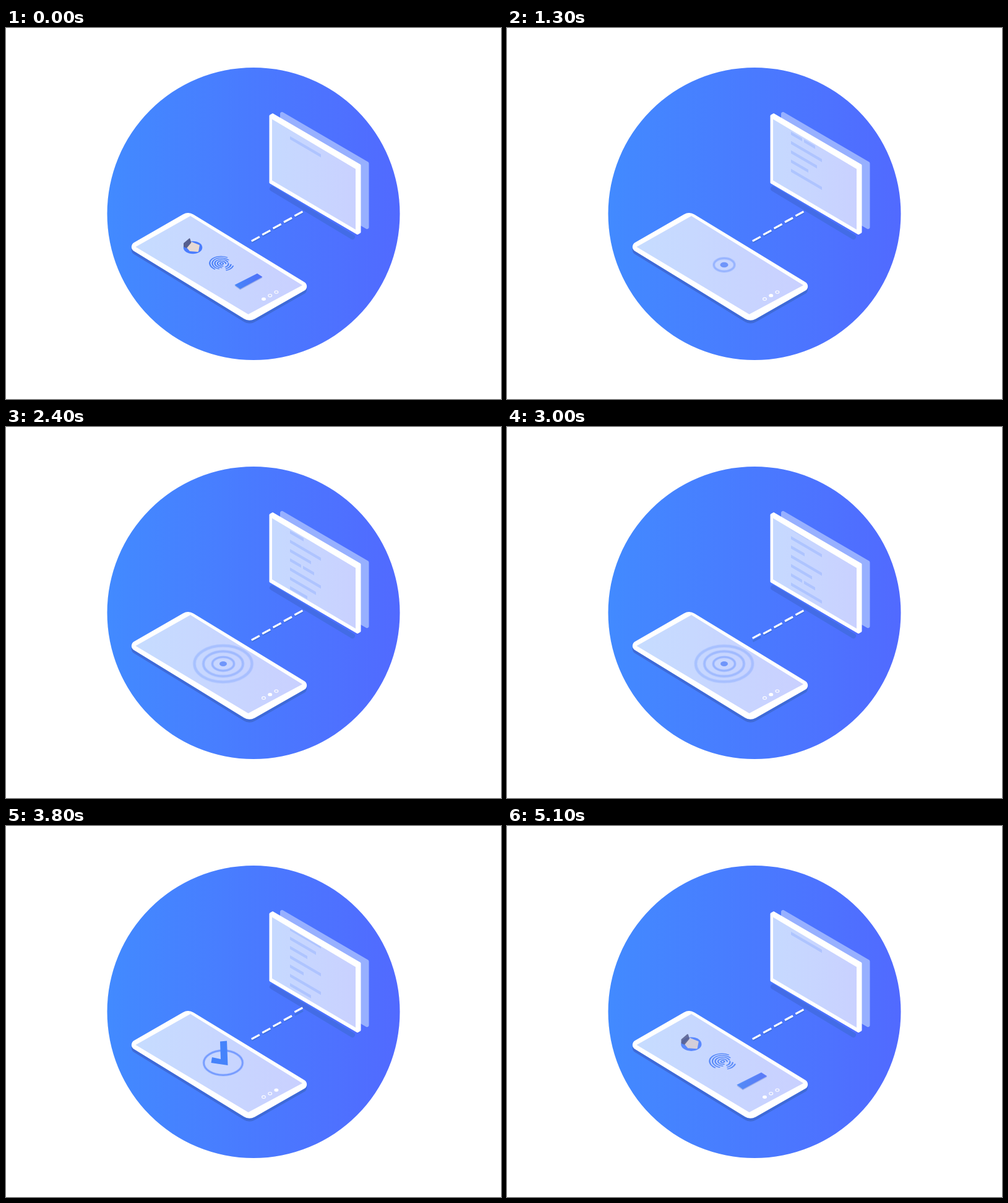
Animation, 800 px wide and 600 px high, one loop 5.2 s. Source, as an HTML page with a canvas:

```html
<!DOCTYPE html>
<html lang="en">
<head>
<meta charset="utf-8">
<title>Phone pairing</title>
<style>
html, body { margin: 0; width: 100%; height: 100%; overflow: hidden; background: #fff; }
canvas { display: block; width: 800px; height: 600px; }
</style>
</head>
<body>
<canvas id="stage" width="800" height="600"></canvas>
<script>
const ctx = document.getElementById('stage').getContext('2d');
const LOOP = 5200, STEP = 100;
const SLOPE = .585;
const blue = alpha => `rgba(74,125,255,${alpha})`;

const ramp = (t, from, to) => Math.min(1, Math.max(0, (t - from) / (to - from)));
const smooth = p => p * p * (3 - 2 * p);
const backOut = p => p <= 0 ? 0 : 1 + 2.7 * (p - 1) ** 3 + 1.7 * (p - 1) ** 2;
const pop = (t, start, length = 300) => backOut(ramp(t, start, start + length));

function gradient(x0, x1, from, to) {
  const g = ctx.createLinearGradient(x0, 0, x1, 0);
  g.addColorStop(0, from);
  g.addColorStop(1, to);
  return g;
}

// Polygon whose corners are rounded by the given radii, used in turn.
function trace(points, radii = [0]) {
  const n = points.length, [ax, ay] = points[n - 1], [bx, by] = points[0];
  ctx.beginPath();
  ctx.moveTo((ax + bx) / 2, (ay + by) / 2);
  points.forEach(([x, y], i) => ctx.arcTo(x, y, ...points[(i + 1) % n], radii[i % radii.length]));
  ctx.closePath();
}

function poly(points, fill, radii) {
  trace(points, radii);
  ctx.fillStyle = fill;
  ctx.fill();
}

function line(x0, y0, x1, y1, width, color, cap = 'butt') {
  ctx.beginPath();
  ctx.moveTo(x0, y0);
  ctx.lineTo(x1, y1);
  ctx.lineWidth = width;
  ctx.lineCap = cap;
  ctx.strokeStyle = color;
  ctx.stroke();
}

function ellipse(x, y, rx, ry) {
  ctx.beginPath();
  ctx.ellipse(x, y, Math.max(rx, 0), Math.max(ry, 0), 0, 0, Math.PI * 2);
}

function shifted(dy, draw) {
  ctx.save();
  ctx.translate(0, dy);
  draw();
  ctx.restore();
}

function scaled(x, y, scale, alpha, draw) {
  if (scale <= 0 || alpha <= 0) return;
  ctx.save();
  ctx.translate(x, y);
  ctx.scale(scale, scale);
  ctx.translate(-x, -y);
  ctx.globalAlpha *= alpha;
  draw();
  ctx.restore();
}

// Upright sheet running down to the right.
const sheet = (x, y, w, h) =>
  [[x, y], [x + w, y + w * SLOPE], [x + w, y + w * SLOPE + h], [x, y + h]];

function drawPhone() {
  const body = [[195.2, 353.8], [294.6, 296.4], [493.9, 418.1], [393.3, 475.4]];
  const radii = [8, 17];
  shifted(5, () => poly(body, '#3e6ad8', radii));
  poly(body, '#fff', radii);
  poly([[209.5, 354], [298, 304], [479, 416], [391.5, 463]],
    gradient(209, 479, '#c6dcff', '#c9d0ff'));
}

function drawPageDots(t) {
  const active = t < 1100 || t >= 4900 ? 0 : t < 3300 ? 1 : 2;
  ctx.save();
  ctx.globalAlpha = t < 4900 ? 1 - ramp(t, 4000, 4200) : ramp(t, 4900, 5100);
  ctx.fillStyle = ctx.strokeStyle = '#fff';
  ctx.lineWidth = 1.1;
  for (let i = 0; i < 3; i++) {
    const r = i === active ? 3.5 : 2.9;
    ellipse(416.5 + 10.2 * i, 438.3 - 5.6 * i, r, r * .75);
    i === active ? ctx.fill() : ctx.stroke();
  }
  ctx.restore();
}

function drawAvatar() {
  ellipse(302, 355, 15.3, 10.3);
  ctx.fillStyle = '#4a7dff';
  ctx.fill();
  poly([[291, 354], [299, 345.5], [313, 351], [311, 362], [297, 361]], '#e6d9d4', [1]);
  poly([[287, 348], [297, 339.5], [299.5, 347], [292, 356], [287, 354]], '#565f8e', [1]);
}

// Nested loops: each ridge arches over the top and trails off at one side.
function drawFingerprint() {
  const RIDGES = 5;
  ctx.save();
  ctx.transform(.86, -.49, .82, .52, 348.5, 381);
  ctx.strokeStyle = '#4a80f8';
  ctx.lineWidth = 1.9;
  ctx.lineCap = 'round';
  for (let k = 0; k < RIDGES; k++) {
    const r = 2.2 + 3.4 * k, inner = RIDGES - 1 - k;
    ctx.beginPath();
    ctx.ellipse(0, 0, r, r * 1.05, 0, Math.PI * (.95 - .1 * inner), Math.PI * (1.9 + .11 * inner));
    ctx.stroke();
    if (k < 2) continue;
    ctx.beginPath();
    ctx.ellipse(0, 0, r, r * 1.05, 0, Math.PI * (.1 + .06 * k), Math.PI * (.62 - .03 * inner));
    ctx.stroke();
  }
  ctx.restore();
}

function drawButton() {
  const shape = [[369.5, 415.5], [406, 397], [414.5, 402.5], [378.5, 422]];
  shifted(1.5, () => poly(shape, 'rgba(70,100,190,.35)'));
  poly(shape, gradient(370, 414, '#4686f8', '#5070fa'));
}

function drawLogin(t) {
  const shown = t < 4900 ? 1 - ramp(t, 900, 1200) : ramp(t, 4900, 5200);
  scaled(349, 381, backOut(shown), Math.min(1, shown * 1.3), () => {
    drawAvatar();
    drawFingerprint();
    drawButton();
  });
}

// A wide faint stroke under a thin one gives a soft edge.
function ring(rx, width, alpha) {
  for (const [w, a] of [[width + 1.5, alpha * .4], [width - .5, alpha * .7]]) {
    ellipse(351, 383, rx, rx * .63);
    ctx.lineWidth = w;
    ctx.strokeStyle = blue(a);
    ctx.stroke();
  }
}

function drawSignal(t) {
  if (t < 1200 || t >= 4200) return;
  const fade = 1 - ramp(t, 3100, 3400), solid = ramp(t, 3200, 3600);
  const leave = 1 - smooth(ramp(t, 3900, 4200));
  const since = Math.max(0, t - 1800) / 800;
  const swing = 2.5 * Math.exp(-since) * Math.cos(since * Math.PI * 2);

  scaled(351, 383, leave, leave, () => {
    for (let k = 0; k < 3; k++) {
      const keep = k === 1 ? solid : 0, visible = k === 1 ? 1 : fade;
      const rx = (17.5 + 14.5 * k + (k === 2 ? swing : 0)) * pop(t, 1200 + 150 * k);
      if (rx > 1 && visible) ring(rx - .6 * keep, 3.2 + .5 * k - keep, (.38 - .07 * k + .42 * keep) * visible);
    }
    const core = pop(t, 1100) * fade;
    ellipse(351, 383, 6 * core, 4 * core);
    ctx.fillStyle = '#6f95fa';
    ctx.fill();
    const check = pop(t, 3300, 400);
    scaled(353, 380, check, Math.min(check, 1), () => poly(
      [[346, 348.5], [357, 347.5], [358.5, 387], [331.5, 383], [333, 374], [347, 377]], '#4583fb'));
  });
}

// A wave lifts the dashes one after another.
function drawDashes(t) {
  for (let i = 0; i < 5; i++) {
    const x = 396.8 + 17.4 * i, y = 344.6 - 10.2 * i;
    const away = Math.abs(t % 2800 - 200 * (i + 1));
    const lift = 3 * Math.max(0, 1 - away / 200);
    line(x + .5, y + 2, x + 13.5, y - 5, 3, '#4070e0');
    line(x, y - lift, x + 13, y - 7 - lift, 3.2, '#fff');
  }
}

const ROW_WIDTHS = [50, 28, 42, 50, 18, 34, 50, 22];

// Rows enter at the top and push the older ones down.
function drawRows(t) {
  const time = t >= 4800 ? t - LOOP : t;
  const scroll = Math.min(time, 4170) * .0027;
  ctx.save();
  trace(sheet(430, 149, 135, 97));
  ctx.clip();
  ctx.globalAlpha = 1 - ramp(time, 4300, 4700);
  for (let i = 0; i < scroll + 2; i++) {
    const width = ROW_WIDTHS[i % ROW_WIDTHS.length];
    const top = 175 + 15 * (scroll - i);
    poly(sheet(459, top, width, 5), blue(.2));
    if (width === 18) poly(sheet(480, top + 21 * SLOPE, width, 5), blue(.2));
  }
  ctx.restore();
}

function drawPanel(t) {
  const hop = peak => smooth(ramp(t, peak - 100, peak)) * (1 - smooth(ramp(t, peak, 4700)));
  const raise = hop(4300);

  line(430 + 11 * raise, 260 + 6.5 * raise, 560 - 10 * raise, 338 - 7 * raise,
    8 - 2.5 * raise, '#436ce6', 'round');
  shifted(-15 * hop(4350), () => poly(sheet(443, 133.5, 143.5, 110), '#97b0ff', [3]));
  shifted(-19.3 * raise, () => {
    // Front face joined with its copy pushed back by the thickness.
    const [a, b, c, d] = sheet(425.5, 141, 142.5, 110);
    const back = ([x, y]) => [x + 5.5, y - 3.2];
    poly([a, back(a), back(b), back(c), c, d], '#fff', [2]);
    poly([[430, 147.5], [565, 228], [565, 326], [430, 246.5]],
      gradient(430, 565, '#c6d9ff', '#c9d1ff'));
    drawRows(t);
  });
}

function draw(t) {
  ctx.fillStyle = '#fff';
  ctx.fillRect(0, 0, 800, 600);
  ellipse(400, 300.5, 236.5, 236.5);
  ctx.fillStyle = gradient(164, 636, '#428aff', '#516aff');
  ctx.fill();
  drawPanel(t);
  drawDashes(t);
  drawPhone();
  drawLogin(t);
  drawSignal(t);
  drawPageDots(t);
}

const start = performance.now();
function tick() {
  const t = Math.max(0, performance.now() - start) % LOOP;
  draw(Math.floor(t / STEP) * STEP);
  requestAnimationFrame(tick);
}
tick();
</script>
</body>
</html>
```
